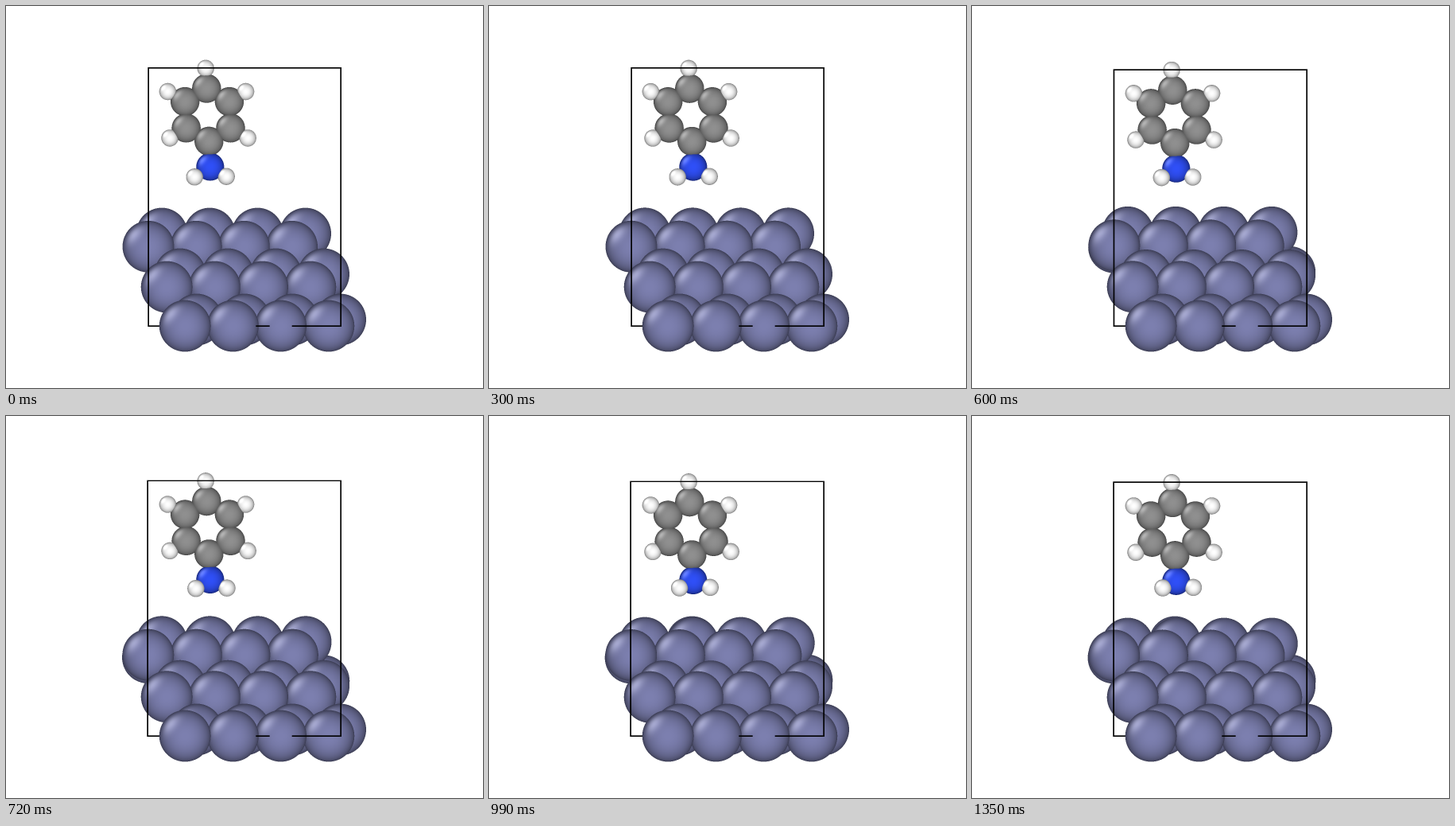
Animation of 600x480 px, one loop 1380 ms. Source, as a matplotlib script:

```python
import numpy as np
import matplotlib.pyplot as plt
from matplotlib.animation import FuncAnimation

W, H, DPI = 600, 480, 100
FRAMES, STEP = 46, 30
LAST = (FRAMES - 1) * STEP
X0, Y0, X1, Y1 = 140, 60, 460, 440   # region that holds the drawing
SS = 3                               # supersampling

METAL = (0.490, 0.502, 0.690)
CARBON = (0.565, 0.565, 0.565)
NITROGEN = (0.188, 0.314, 0.973)
HYDROGEN = (1.0, 1.0, 1.0)
R_METAL, R_C, R_N, R_H = 32.4, 18.2, 17.5, 10.7

LIGHT = np.array([-1.8, 1.5, -0.2])
LIGHT /= np.linalg.norm(LIGHT)

PITCH, RECESS = 60.2, 14.6   # step along a metal row, sideways and in depth
RING_X, RING_Y = 253.8, 136.7

# Metal rows, back to front: x, y, depth, drift, passing lift, lasting shift
ROWS = [
    (196, 286, -263, 0.6, -2.2, 0),
    (179, 302.3, -206, 1.2, -1, -1.4),
    (219, 337, -163, 0, 0, 2.7),
    (202.2, 353, -103, 0, -0.6, 0.4),
    (240, 394, -60, 0, 0, 0),
    (225.2, 402, 0, 0, 0, 0),
]
# Deeper atoms that come into view: row, column, drift, lasting shift
DEEP = [(0, 1, -1, -2), (1, 0, -1, 1.5), (2, 3, 0.3, -5)]


def settle(t):
    """Smooth step from 0 to 1 as the structure relaxes."""
    return 1 / (1 + np.exp((590 - t) / 85))


def sink(t):
    """Drop of the cell top and the molecule, with a late creep."""
    return 4 * settle(t) + 1.4 * (t / LAST) ** 3


def slide(t):
    return np.sin(np.pi / 2 * np.clip((t - 300) / (LAST - 300), 0, 1))


def bump(t, width):
    return np.exp(-((t - 740) / width) ** 2)


def ring(radius, count):
    """Points of a slightly sheared hexagon, the bottom corner last."""
    for k in (0, 1, -1, 2, -2, 3)[:count]:
        a = np.radians(60 * k - 90)
        yield (RING_X + radius * (0.97 * np.cos(a) + 0.045 * np.sin(a)),
               RING_Y + radius * np.sin(a))


def metal(t):
    for row, col, drift, shift in DEEP:
        x, y, z = ROWS[row][:3]
        yield (x + col * PITCH + drift * slide(t), y + shift * settle(t),
               z - 120 - col * RECESS, R_METAL, METAL)
    for x, y, z, drift, lift, shift in ROWS:
        dy = lift * bump(t, 270) + shift * settle(t)
        for col in range(4):
            dx = drift * slide(t) * (col - 0.5) / 2
            yield (x + col * PITCH + dx, y + dy,
                   z - col * RECESS, R_METAL, METAL)


def molecule(t):
    dy = sink(t)
    for x, y in ring(33.2, 6):
        yield x, y + dy, -100, R_C, CARBON
    for x, y in ring(58.4, 5):
        yield x, y + dy, -97, R_H, HYDROGEN
    yield 256.8, 202 + dy, -100, R_N, NITROGEN
    dy = 1.2 * settle(t) + bump(t, 100)
    yield 237.2 + 2.8 * slide(t), 214.8 + dy, -88, R_H, HYDROGEN
    yield 277.2 + 1.2 * slide(t), 214.2 + dy, -94, R_H, HYDROGEN


def draw_ball(rgb, depth, x, y, z, r, color):
    cx, cy, cr = (x - X0) * SS, (y - Y0) * SS, r * SS
    top, left = int(cy - cr), int(cx - cr)
    box = np.s_[top:int(cy + cr) + 2, left:int(cx + cr) + 2]
    h, w = depth[box].shape
    ny = -((np.arange(top, top + h) + 0.5 - cy) / cr)[:, None]
    nx = ((np.arange(left, left + w) + 0.5 - cx) / cr)[None, :]
    rest = 1 - nx ** 2 - ny ** 2
    nz = np.sqrt(np.clip(rest, 0, 1))
    front = z + r * nz
    seen = (rest > 0) & (front > depth[box])

    facing = nx * LIGHT[0] + ny * LIGHT[1] + nz * LIGHT[2]
    gloss = 0.25 * np.clip(2 * facing * nz - LIGHT[2], 0, 1) ** 6
    shade = (0.4 + 0.6 * nz)[..., None] * np.array(color) + gloss[..., None]
    rgb[box][seen] = np.clip(shade, 0, 1)[seen]
    depth[box][seen] = front[seen]


def draw_bar(rgb, depth, xa, ya, xb, yb):
    """Black cell edge in the front plane, hidden by balls that stick out."""
    half = 0.8
    a, b = round((xa - half - X0) * SS), round((xb + half - X0) * SS)
    c, d = round((ya - half - Y0) * SS), round((yb + half - Y0) * SS)
    box = np.s_[c:d, a:b]
    rgb[box][depth[box] < 0] = 0


def render(t):
    h, w = (Y1 - Y0) * SS, (X1 - X0) * SS
    rgb = np.ones((h, w, 3))
    depth = np.full((h, w), -1e6)
    for ball in (*metal(t), *molecule(t)):
        draw_ball(rgb, depth, *ball)
    left, right = 179.1 - settle(t), 421.2
    top, bottom = 77.8 + sink(t), 402.3
    for y in (top, bottom):
        draw_bar(rgb, depth, left, y, right, y)
    for x in (left, right):
        draw_bar(rgb, depth, x, top, x, bottom)
    page = np.ones((H, W, 3))
    page[Y0:Y1, X0:X1] = rgb.reshape(Y1 - Y0, SS, X1 - X0, SS, 3).mean(axis=(1, 3))
    return page


fig = plt.figure(figsize=(W / DPI, H / DPI), dpi=DPI, facecolor="white")
ax = fig.add_axes([0, 0, 1, 1])
ax.axis("off")
picture = ax.imshow(render(0), interpolation="nearest", aspect="auto")


def update(frame):
    picture.set_data(render(frame * STEP))
    return [picture]


anim = FuncAnimation(fig, update, frames=FRAMES, interval=STEP, repeat=True)
plt.show()
```
